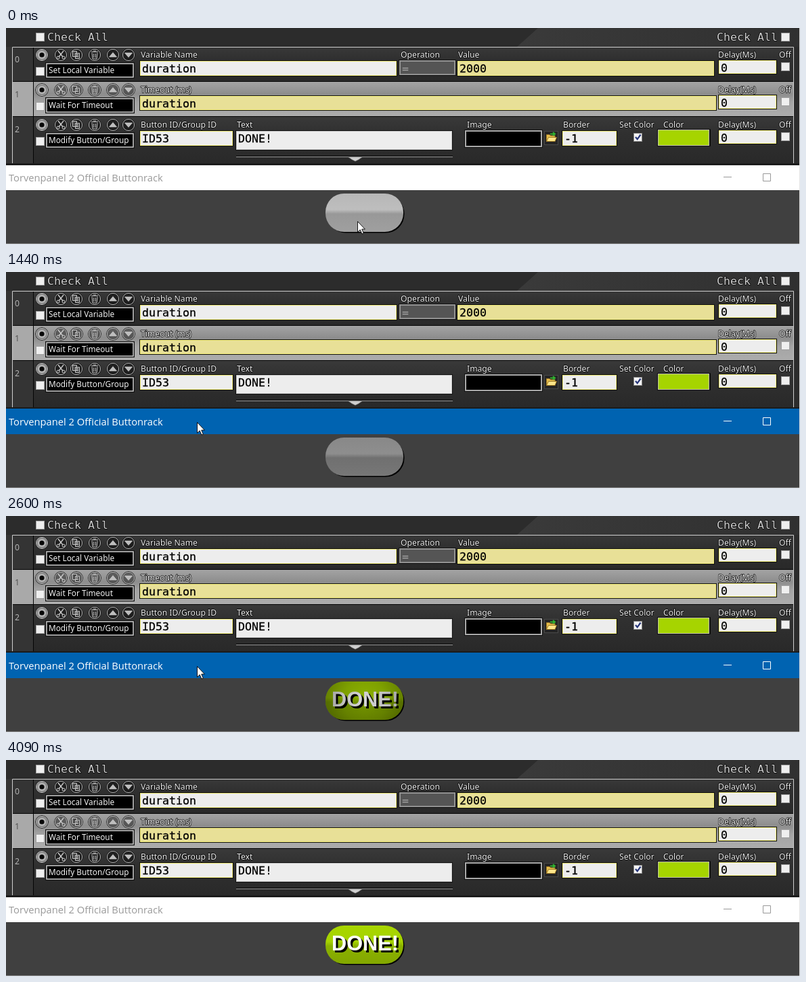
Write an HTML page that moves like this. It is 1173x321 px and loops after 4120 ms.

```html
<!DOCTYPE html>
<html lang="en">
<head>
<meta charset="utf-8">
<title>Button timeout</title>
<style>
html, body { margin: 0; width: 100%; height: 100%; overflow: hidden; background: #404040; }
svg { display: block; width: 100%; height: 100%; }
text { white-space: pre; }
.label { font: 12.2px "Noto Sans", "Open Sans", sans-serif; fill: #f2f2f2; }
.kind { font: 11.8px "Noto Sans", "Open Sans", sans-serif; fill: #f2f2f2; }
.index { font: 12.2px "Noto Sans", "Open Sans", sans-serif; }
.edge { paint-order: stroke; stroke: #000; stroke-width: 1.3px; stroke-linejoin: round; }
.mono { font: 16.6px "DejaVu Sans Mono", "Noto Sans Mono", monospace; }
.value { stroke: #000; stroke-width: .3px; }
.title { font: 14.7px "Open Sans", "Noto Sans", sans-serif; }
.done { font: bold 30.7px "Liberation Sans", Arial, sans-serif; }
</style>
</head>
<body>
<svg id="stage" viewBox="0 0 1173 321" preserveAspectRatio="none">
  <defs>
    <linearGradient id="strip">
      <stop offset="0" stop-color="#3a3a3a"/><stop offset="1" stop-color="#303030"/>
    </linearGradient>
    <linearGradient id="dark" x2="0" y2="1">
      <stop offset="0" stop-color="#393939"/><stop offset=".35" stop-color="#303030"/>
      <stop offset="1" stop-color="#292929"/>
    </linearGradient>
    <linearGradient id="picked" x2="0" y2="1">
      <stop offset="0" stop-color="#a3a3a3"/><stop offset=".35" stop-color="#8d8d8d"/>
      <stop offset=".6" stop-color="#a4a4a4"/><stop offset="1" stop-color="#acacac"/>
    </linearGradient>
    <linearGradient id="face" x2="0" y2="1">
      <stop offset="0"/><stop offset=".42"/><stop offset=".53"/><stop offset="1"/>
    </linearGradient>
    <radialGradient id="wave">
      <stop offset="0" stop-opacity=".25"/><stop offset=".45" stop-opacity=".4"/>
      <stop offset="1" stop-opacity=".75"/>
    </radialGradient>
    <clipPath id="pill"><rect x="472" y="246" width="115" height="57" rx="27.5"/></clipPath>
  </defs>
  <g id="panel"></g>
  <rect y="241" width="1173" height="80" fill="#404040"/>
  <rect id="bar" width="1172"/>
  <text id="name" class="title" x="4" y="228">Torvenpanel 2 Official Buttonrack</text>
  <path id="controls" d="M1060 221.5h12M1118.5 216.5h11v11h-11z" fill="none"/>
  <rect x="474.5" y="248.5" width="114" height="56" rx="27.5" fill="#000"/>
  <rect x="472" y="246" width="115" height="57" rx="27.5" fill="url(#face)"/>
  <g id="done" class="done">
    <text x="484" y="286" fill="#000">DONE!</text>
    <text x="481" y="283" fill="#fff">DONE!</text>
  </g>
  <g clip-path="url(#pill)"><circle id="ripple" cx="530" cy="275" fill="url(#wave)"/></g>
  <path d="M0 320.5H1173" stroke="#858585"/>
  <path d="M1172.5 0V321" stroke="#e4e4e4"/>
  <path id="cursor" d="M.5 .5V16.3L4.2 12.8L6.9 19L9.3 18L6.7 12H11.4Z" fill="#fff" stroke="#000" stroke-width=".9"/>
</svg>
<script>
const $ = id => document.getElementById(id);
const LOOP = 4120;

// static panel
const rect = (x, y, w, h, fill, extra = '') =>
  `<rect x="${x}" y="${y}" width="${w}" height="${h}" fill="${fill}" ${extra}/>`;
const text = (x, y, s, cls, fill) =>
  `<text x="${x}" y="${y}" class="${cls}"${fill ? ` fill="${fill}"` : ''}>${s}</text>`;
const label = (x, y, s) => text(x, y, s, 'label edge');
const path = (d, stroke, fill = 'none', w = 1) =>
  `<path d="${d}" fill="${fill}" stroke="${stroke}" stroke-width="${w}"/>`;
const box = (x, y) => rect(x + .5, y + .5, 12, 12, '#efefef', 'stroke="#a0a0a0"');
const LIGHT = '#ededed', KHAKI = '#e8e097';

function field(x, y, w, h, fill, value = '', rim = '#f3ee7c') {
  return rect(x, y, w, h, '#111') +
    rect(x + 1.5, y + 1.5, w - 3, h - 3, fill, `stroke="${rim}"`) +
    text(x + 4, y + 18, value, 'mono value', '#000');
}

function knob(x, y, glyph) {
  return `<g transform="translate(${x} ${y})"><circle r="9.3" fill="#000" fill-opacity=".4" stroke="#111"/>` +
    `<circle r="8.6" fill="none" stroke="#b4b4b4"/>${glyph}</g>`;
}

const dial = '<circle r="8.3" fill="#8c8c8c"/><circle r="6" fill="#b5b5b5"/><circle r="3.6" fill="#080808"/>';
const scissors = path('M-4 -6L3 3M4 -6L-3 3', '#cecece', 'none', 1.3) +
  '<g fill="none" stroke="#cecece"><circle cx="-4" cy="4" r="2"/><circle cx="4" cy="4" r="2"/></g>';
const copy = path('M-5.5 -5.5h6v8h-6zM-1.5 -2.5h6v8h-6z', '#c6c6c6', '#444') +
  path('M0 0h3M0 2.5h3', '#c6c6c6');
const trash = path('M-5 -4.5H5M-2 -6H2M-4 -3L-3 6H3L4 -3M-1.3 -2V4M1.3 -2V4', '#c6c6c6');
const up = path('M-5.5 3L0 -3.5L5.5 3Z', '#ddd', '#bdbdbd', .6);
const down = path('M-5.5 -3L0 3.5L5.5 -3Z', '#ddd', '#bdbdbd', .6);

function row(i, name) {
  const y = 28 + 52 * i, h = i < 2 ? 51 : 70, on = i === 1;
  const icons = [[53, dial], [81, scissors], [104, copy], [131, trash], [158, up], [181, down]];
  return rect(10, y, 30, h, on ? '#a9a9a9' : '#343434') +
    rect(41, y, 1122, h, `url(#${on ? 'picked' : 'dark'})`) +
    path(`M10 ${y + h + .5}H1163`, '#050505') +
    text(13, y + 23, i, 'index', on ? '#555' : '#b4b4b4') +
    icons.map(([x, g]) => knob(x, y + 12, g)).join('') +
    box(44, y + 30) +
    rect(58, y + 23, 132, 24, '#111') +
    rect(60, y + 25, 128, 20, '#000', 'stroke="#c5c5c5" stroke-width="1.6"') +
    text(63, y + 39, name, 'kind') +
    label(1052, y + 16, 'Delay(Ms)') + label(1142, y + 16, 'Off') +
    field(1052, y + 19, 87, 22, LIGHT, '0') + box(1145, y + 23);
}

$('panel').innerHTML =
  rect(0, 0, 1173, 204, '#2c2c2c') +
  '<path d="M786 0H1173V28H755Z" fill="url(#strip)"/>' +
  rect(0, 28, 9, 176, '#343434') +
  box(44, 7) + text(61, 19, 'Check All', 'mono edge', '#d2d2d2') +
  text(1050, 19, 'Check All', 'mono edge', '#d2d2d2') + box(1145, 7) +
  row(0, 'Set Local Variable') + row(1, 'Wait For Timeout') + row(2, 'Modify Button/Group') +
  path('M9.5 204V28.5H1163.5V204', '#cfcfcf') + path('M40.5 29V203', '#050505') +
  rect(0, 201, 1173, 3, '#1b1b1b') +
  // variable row
  label(199, 44, 'Variable Name') + field(197, 48, 381, 24, LIGHT, 'duration') +
  label(583, 44, 'Operation') + rect(580, 47, 85, 24, '#111') +
  rect(582, 49, 81, 20, '#555', 'stroke="#929292" stroke-width="2"') +
  text(585, 66, '=', 'mono', '#a8a8a8') +
  label(668, 44, 'Value') + field(666, 48, 381, 24, KHAKI, '2000') +
  // timeout row
  label(199, 96, 'Timeout (ms)') + field(197, 100, 853, 23, KHAKI, 'duration') +
  // button row
  label(199, 148, 'Button ID/Group ID') + field(197, 152, 139, 24, LIGHT, 'ID53') +
  label(341, 148, 'Text') + field(339, 152, 321, 30, LIGHT, 'DONE!', '#c9c9c9') +
  path('M340 190.5H660', '#000') + path('M340 191.5H660', '#a2a2a2') +
  path('M506 192H526L521 195.5L516 198L511 195.5Z', '#777', '#d0d0d0', .6) +
  label(681, 148, 'Image') + rect(677, 151, 116, 27, '#111') +
  rect(679, 153, 112, 23, '#000', 'stroke="#aaa" stroke-width="2"') +
  rect(795.5, 153.5, 20, 20, '#242424', 'stroke="#4a4a4a"') +
  path('M798.5 168.5V158.5H803L804.5 160H811V168.5Z', '#9c7724', '#e5bd4b') +
  path('M798.5 168.5L801.5 162.5H813.5L811 168.5Z', '#9c7724', '#ffe58a') +
  path('M804 157.5H810M808 155L811 157.5L808 160', '#2fae2f', 'none', 2) +
  label(823, 148, 'Border') + field(821, 152, 82, 24, LIGHT, '-1') +
  label(906, 148, 'Set Color') + rect(927.5, 156.5, 12, 12, '#f4f4f4', 'stroke="#888"') +
  path('M930 162L932.7 165.3L937.5 158.5', '#26357a', 'none', 2.2) +
  label(971, 148, 'Color') + rect(962, 150, 79, 26, '#111') +
  rect(963.5, 151.5, 75, 23, '#a6d400', 'stroke="#c4c4b0"');

// motion
const set = (el, o) => { for (const k in o) el.setAttribute(k, o[k]); };
const stops = [...document.querySelectorAll('#face stop')];
const faces = {
  light: ['#b7b7b7', '#bebebe', '#989898', '#a0a0a0'],
  dim: ['#888', '#8e8e8e', '#707070', '#777'],
  green: ['#a8d600', '#a6d300', '#8bb200', '#83a700']
};
const goLeft = [[507, 302], [459, 299], [402, 274], [346, 238], [306, 212], [286, 205], [282, 223]];
const goRight = [[291, 221], [338, 214], [406, 206], [472, 199], [523, 194]];

function cursorAt(t) {
  if (t < 1230) return [519, 287];
  if (t < 3270) return goLeft[Math.min(6, Math.floor((t - 1230) / 35))];
  return goRight[Math.floor((t - 3270) / 28)];
}

function draw(t) {
  const active = t >= 400 && t < 4090;
  set($('bar'), { y: active ? 203 : 204, height: active ? 38 : 37, fill: active ? '#0063b1' : '#fff' });
  set($('name'), { fill: active ? '#fff' : '#999' });
  set($('controls'), { stroke: active ? '#fff' : '#999' });

  const face = faces[t < 430 ? 'light' : t < 2400 ? 'dim' : 'green'];
  stops.forEach((s, i) => set(s, { 'stop-color': face[i] }));
  set($('done'), { visibility: t >= 2400 ? 'visible' : 'hidden' });

  const age = t - 2400, live = age >= 0 && age < 520;
  set($('ripple'), { r: live ? 16.5 + age * .27 : 0, opacity: live ? 1 - age / 520 : 0 });

  const p = cursorAt(t);
  set($('cursor'), { visibility: p ? 'visible' : 'hidden' });
  if (p) set($('cursor'), { transform: `translate(${p})` });
}

const start = performance.now();
function tick() {
  draw((performance.now() - start) % LOOP);
  requestAnimationFrame(tick);
}
tick();
</script>
</body>
</html>
```
